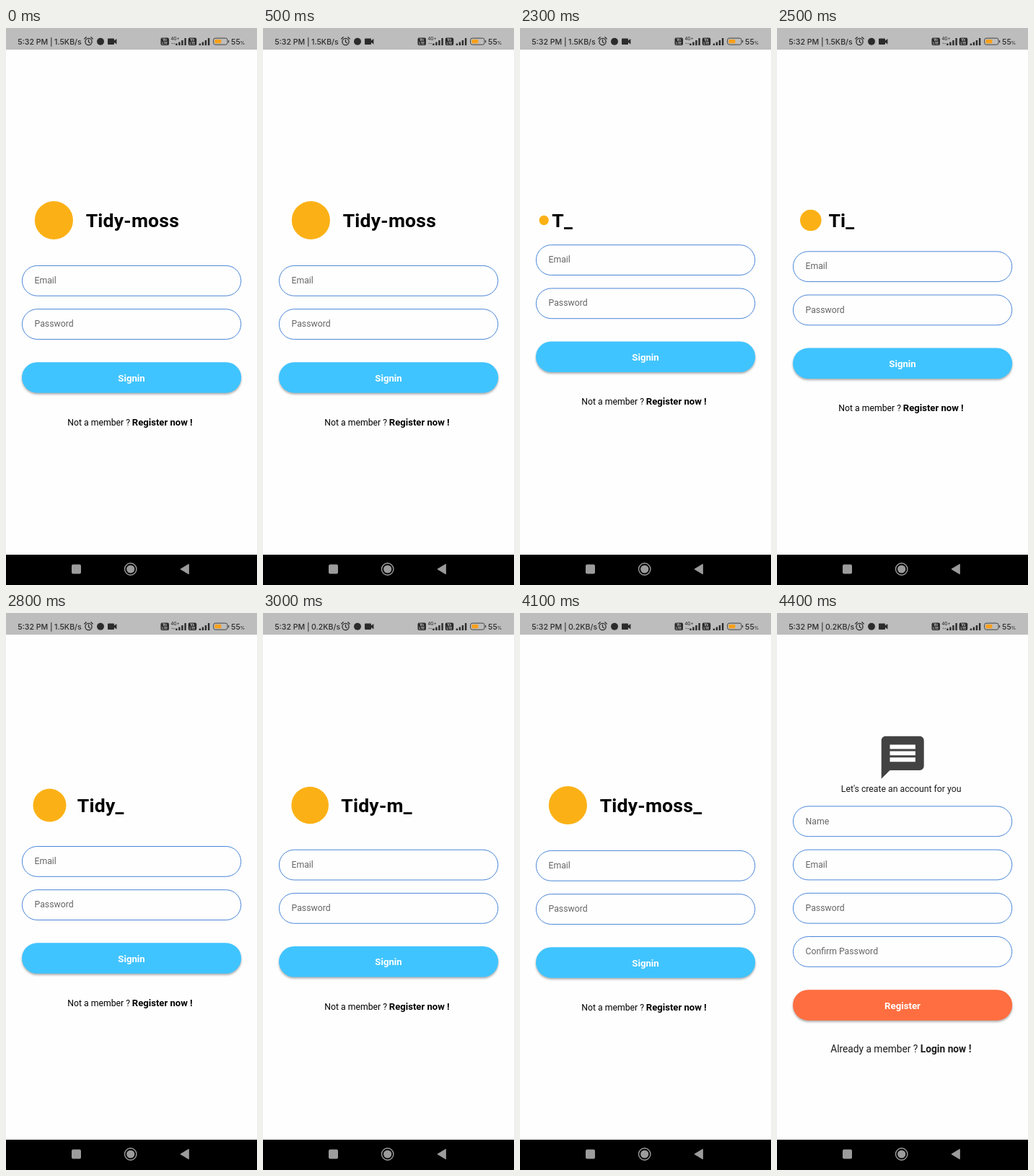
Write an HTML page that moves like this. It is 348 px wide and 772 px high and loops after 5100 ms.

```html
<!DOCTYPE html>
<html lang="en">
<head>
<meta charset="utf-8">
<title>Sign in and register</title>
<style>
  html, body { margin: 0; width: 100%; height: 100%; overflow: hidden; background: #fefefe; }
  svg { display: block; width: 100%; height: 100%; font-family: Roboto, sans-serif; }
  text { white-space: pre; }
  .field { fill: none; stroke: #4a86d8; }
  .hint { font-size: 12.25px; fill: #666; }
  .button { filter: drop-shadow(0 2px 1.5px rgba(0, 0, 0, .32)); }
  .label { font-size: 13.2px; font-weight: 700; fill: #fff; text-anchor: middle; }
  .bold { font-weight: 700; }
  #title { font-size: 26.57px; font-weight: 700; letter-spacing: .22px; }
  #status { font-family: Inter, sans-serif; font-size: 10.6px; font-weight: 500; fill: #2c2c2c; }
</style>
</head>
<body>
<svg viewBox="0 0 348 772">
  <defs>
    <g id="volte">
      <rect width="11.5" height="10.5" rx="2"/>
      <g fill="#ccc" font-size="4.4" font-weight="700" text-anchor="middle">
        <text x="5.7" y="4.7">Vo</text><text x="5.7" y="9.2">LTE</text>
      </g>
    </g>
    <path id="bars" d="M0 8h2.4v2.5H0zM4 6h2.4v4.5H4zM8 3.4h2.4v7.1H8zM12.2 .5h2.4v10h-2.4z"/>
  </defs>

  <rect width="348" height="30" fill="#bdbdbd"/>
  <g id="status">
    <text x="16.2" y="22.5">5:32 PM |</text>
    <text id="rate" x="67" y="22.5"></text>
    <g fill="none" stroke="#2c2c2c" stroke-width="1.3" stroke-linecap="round">
      <circle cx="114.5" cy="19" r="4.6"/>
      <path d="M114.5 16.5v3l2 1.2M108.8 15l2.4-2.2M120.2 15l-2.4-2.2"/>
    </g>
    <circle cx="131" cy="18.7" r="5"/>
    <path d="M142 14.5h7q1 0 1 1v2l3.4-2.6v7.6l-3.4-2.6v2q0 1-1 1h-7q-1 0-1-1v-6.4q0-1 1-1z"/>
    <use href="#volte" x="214.5" y="13.5"/>
    <text x="228.5" y="17.3" font-size="5.8">4G+</text>
    <path d="M229.2 22l1.2-1.8 1.2 1.8zM232 21l1.2 1.8 1.2-1.8z" fill="#666"/>
    <use href="#bars" x="235.2" y="13.5"/>
    <use href="#volte" x="252.7" y="13.5"/>
    <use href="#bars" x="267.7" y="13.5"/>
    <rect x="287.6" y="14.1" width="19.4" height="9" rx="2.6" fill="none" stroke="#444"/>
    <rect x="289.4" y="15.9" width="9" height="5.4" rx="1" fill="#f9a01b"/>
    <path d="M308.2 17h1v3.2h-1z"/>
    <text x="312" y="22.5">55<tspan font-size="6.4">%</tspan></text>
  </g>

  <g id="login">
    <circle id="logo" cy="266.5" fill="#fbb116"/>
    <text id="title" y="276"></text>
    <g id="form">
      <text x="85.2" y="222" font-size="12.25">Not a member ?</text>
      <text x="174.8" y="222" font-size="13.1" class="bold">Register now !</text>
    </g>
  </g>

  <g id="register" fill="#1c1c1c">
    <path transform="translate(138.8 164.9) scale(2.95)" fill="#424242" d="M20 2H4c-1.1 0-1.99.9-1.99 2L2 22l4-4h14c1.1 0 2-.9 2-2V4c0-1.1-.9-2-2-2zm-2 12H6v-2h12v2zm0-3H6V9h12v2zm0-3H6V6h12v2z"/>
    <text x="88.8" y="247.5" font-size="12.25">Let's create an account for you</text>
    <text x="74.2" y="609.3" font-size="13.75">Already a member ?</text>
    <text x="198.8" y="609.3" font-size="13.75" class="bold">Login now !</text>
  </g>

  <rect y="730" width="348" height="42"/>
  <g fill="#9c9c9c">
    <rect x="91" y="743.5" width="13" height="13" rx="2"/>
    <circle cx="172.7" cy="750" r="5.6"/>
    <circle cx="172.7" cy="750" r="8.2" fill="none" stroke="#9c9c9c" stroke-width="1.4"/>
    <path d="M242 750l11.3-6.8v13.6z" stroke="#9c9c9c" stroke-linejoin="round"/>
  </g>
</svg>
<script>
const LOOP = 5100, NAME = "Tidy-moss";
const FULL = 88.55, LEFT = 22.14, LINE = 31.1;
const $ = id => document.getElementById(id);

const field = (y, hint) =>
  `<rect class="field" x="22.4" y="${y + .4}" width="303.4" height="41.8" rx="20.9"/>
   <text class="hint" x="39.5" y="${y + 25}">${hint}</text>`;
const button = (y, label, fill) =>
  `<rect class="button" x="22" y="${y}" width="304.2" height="42.5" rx="21.25" fill="${fill}"/>
   <text class="label" x="174" y="${y + 26.3}">${label}</text>`;
const add = (id, parts) => $(id).insertAdjacentHTML("beforeend", parts.join(""));

add("form", [field(0, "Email"), field(60.2, "Password"), button(134.2, "Signin", "#40c4ff")]);
add("register", [
  ...["Name", "Email", "Password", "Confirm Password"].map((hint, i) => field(267.5 + 60.2 * i, hint)),
  button(522.2, "Register", "#ff6e40")
]);

// Typing begins at 2150, one letter per 140 ms; the cursor then blinks.
function typed(t) {
  if (t < 1100) return NAME;
  const cursor = t < 3800 || t >= 4100;
  return NAME.slice(0, Math.floor((t - 2150) / 140)) + (cursor ? "_" : "");
}

function draw(t) {
  const login = t < 1100 || (t >= 2300 && t < 4300);
  $("login").style.display = login ? "" : "none";
  $("register").style.display = login ? "none" : "";
  $("rate").textContent = t >= 3000 ? "0.2KB/s" : "1.5KB/s";
  if (!login) return;

  const p = t < 1100 ? 1 : Math.min(1, (t - 2167) / 1000);
  const size = FULL * (1 - (1 - p) ** 2);
  $("logo").setAttribute("cx", LEFT + size / 2);
  $("logo").setAttribute("r", size * .3);
  $("title").setAttribute("x", LEFT + size);
  $("title").textContent = typed(t);
  $("form").setAttribute("transform", `translate(0 ${284.75 + Math.max(size, LINE) / 2})`);
}

const start = performance.now();
function tick() {
  draw((performance.now() - start) % LOOP);
  requestAnimationFrame(tick);
}
tick();
</script>
</body>
</html>
```
